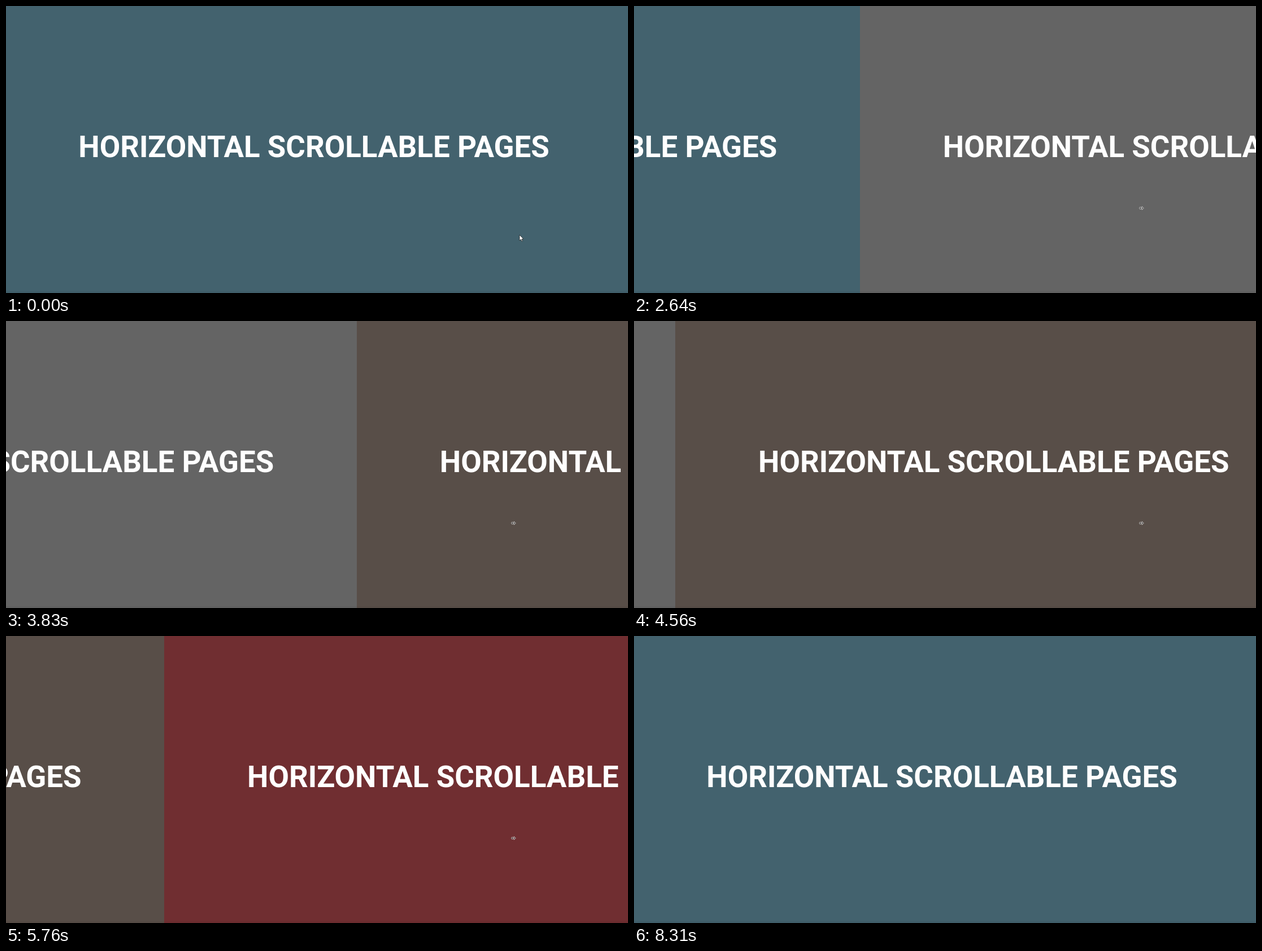
Write an HTML page with a canvas that moves like this. It is 1101 px wide and 509 px high and loops after 8.77 s.

```html
<!DOCTYPE html>
<html lang="en">
<head>
<meta charset="utf-8">
<title>Horizontal scrollable pages</title>
<style>
  html, body { margin: 0; width: 100%; height: 100%; overflow: hidden; background: #43626e; }
  canvas { display: block; }
</style>
</head>
<body>
<canvas id="stage" width="1101" height="509"></canvas>
<script>
const canvas = document.getElementById('stage');
const ctx = canvas.getContext('2d');
const W = canvas.width, H = canvas.height;

const LOOP = 8770;
const STEP = 79.15;
const STEP_ANCHOR = 1880;

const TITLE = 'HORIZONTAL SCROLLABLE PAGES';
const FONT = '700 52.88px Roboto, sans-serif';
const PAGE_COLORS = ['#43626e', '#646464', '#584e48', '#702e31'];
const PAGE_WIDTH = 1127;
const PAGE_LEFT = -18.5;
const END = PAGE_WIDTH * (PAGE_COLORS.length - 1);

const PAN_START = 891, CRUISE_START = 2300, RETURN_START = 6690;
const RETURN_TIME = 490;

const easeOut = u => 1 - (1 - u) ** 2;
const easeInOut = u => u * u * (3 - 2 * u);
const slowing = u => u ** 0.75;
const clamp01 = u => Math.min(1, Math.max(0, u));
const progress = (t, from, to) => clamp01((t - from) / (to - from));

const HOME = { x: 909, y: 406 };
const ORIGIN = { x: 803, y: 363 };
const LEGS = [
  { from: 0, to: 300, ...ORIGIN, ease: easeOut },
  { from: PAN_START, to: CRUISE_START, x: 898, y: 358.5, ease: slowing },
  { from: 6490, to: 7240, x: 390, y: 337.5, ease: easeInOut },
  { from: 7650, to: 8290, x: 1075, y: 510, ease: easeInOut }
];

function snap(t) {
  return STEP_ANCHOR + STEP * Math.floor((t - STEP_ANCHOR) / STEP + 0.4);
}

function pointerAt(t) {
  let { x, y } = HOME;
  for (const leg of LEGS) {
    const u = leg.ease(progress(t, leg.from, leg.to));
    x += (leg.x - x) * u;
    y += (leg.y - y) * u;
  }
  return { x, y };
}

function cruise(t) {
  const d = t - 2671.5;
  return 708.5 + 0.7594 * d + 3.1e-6 * d * d;
}

// Pan speed follows the pointer's distance from the origin
function scrollAt(t) {
  if (t < CRUISE_START) {
    return cruise(CRUISE_START) * progress(t, PAN_START, CRUISE_START) ** 2.2;
  }
  if (t < RETURN_START) return Math.min(END, cruise(t));
  return END * (1 - progress(t, RETURN_START, RETURN_START + RETURN_TIME) ** 3.2);
}

function polygon(points) {
  ctx.beginPath();
  points.forEach(([x, y]) => ctx.lineTo(x, y));
  ctx.closePath();
}

function paint(fill, stroke, width) {
  ctx.fillStyle = fill;
  ctx.fill();
  ctx.strokeStyle = stroke;
  ctx.lineWidth = width;
  ctx.stroke();
}

function arrow() {
  polygon([[0, 0], [0, 10], [2.3, 7.9], [3.9, 11.4], [5.4, 10.7], [3.9, 7.3], [7, 7.2]]);
  paint('#fff', '#111', 0.7);
}

function dot(x) {
  ctx.beginPath();
  ctx.arc(x, 0, 1.7, 0, Math.PI * 2);
  paint('#222a', '#eee', 0.8);
}

function wedge(near, angle = 0) {
  ctx.save();
  ctx.rotate(angle);
  polygon([[near, -2.8], [near + 3.3, 0], [near, 2.8]]);
  paint('#222a', '#eee', 0.8);
  ctx.restore();
}

function panOrigin(directions) {
  dot(0);
  for (let i = 0; i < directions; i++) wedge(4, i * Math.PI * 2 / directions);
}

function panSide(sign) {
  ctx.scale(sign, 1);
  dot(-1.7);
  wedge(1);
}

function drawPointer({ x, y }, t) {
  ctx.save();
  ctx.translate(x, y);
  if (t < 570 || t >= 7540) arrow();
  else if (t < 730) panOrigin(4);
  else if (t < 970) panOrigin(2);
  else panSide(x >= ORIGIN.x ? 1 : -1);
  ctx.restore();
}

function drawPages(scroll) {
  ctx.font = FONT;
  ctx.textAlign = 'center';
  ctx.textBaseline = 'alphabetic';
  PAGE_COLORS.forEach((color, i) => {
    const left = PAGE_LEFT + i * PAGE_WIDTH - scroll;
    if (left > W || left + PAGE_WIDTH < 0) return;
    ctx.fillStyle = color;
    ctx.fillRect(Math.round(left), 0, PAGE_WIDTH + 1, H);
    ctx.fillStyle = '#fff';
    ctx.fillText(TITLE, left + PAGE_WIDTH / 2, 267.7);
  });
  ctx.fillStyle = 'rgba(0, 0, 0, 0.04)';
  ctx.fillRect(0, H - 3, W, 3);
}

const start = performance.now();

function render() {
  const t = (performance.now() - start) % LOOP;
  const shown = snap(t);
  drawPages(scrollAt(shown));
  drawPointer(pointerAt(shown), t);
  requestAnimationFrame(render);
}
render();
</script>
</body>
</html>
```
